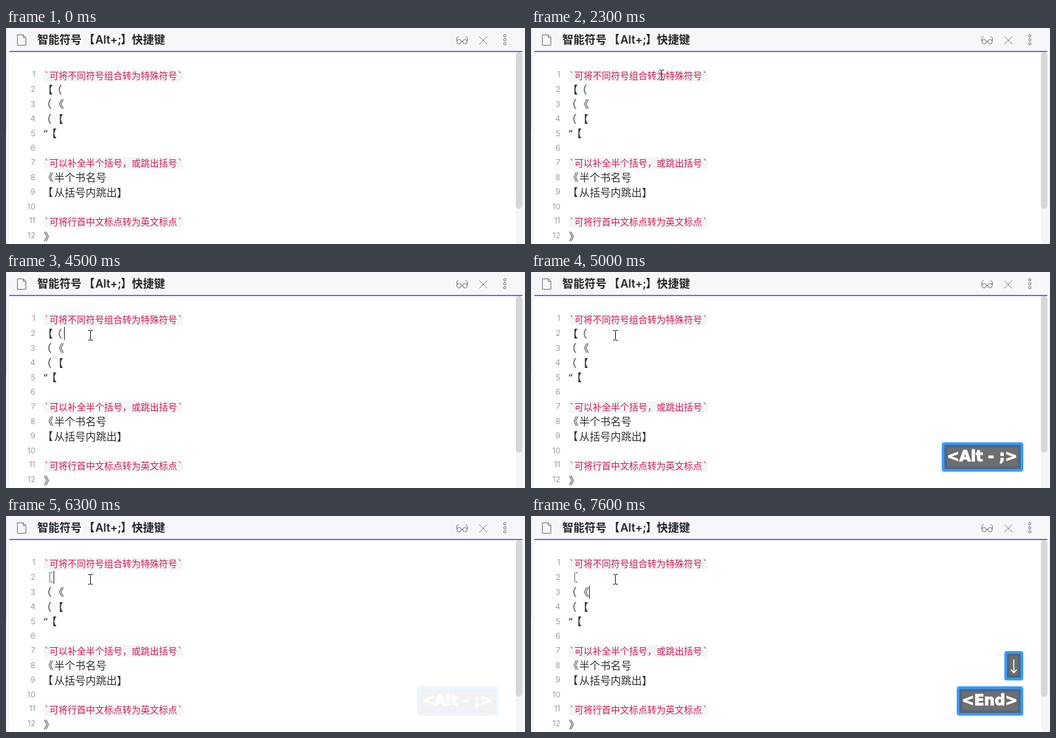
These frames come from a looping animation (796x331 px, 8000 ms). An HTML page with a canvas:

```html
<!DOCTYPE html>
<html lang="zh-CN">
<head>
<meta charset="utf-8">
<title>智能符号</title>
<style>
html, body { margin: 0; width: 100%; height: 100%; overflow: hidden; background: #fff; }
canvas { display: block; width: 796px; height: 331px; }
</style>
</head>
<body>
<canvas id="stage" width="796" height="331"></canvas>
<script>
const ctx = document.getElementById('stage').getContext('2d');
const LOOP = 8000, STEP = 100, ROW = 22.4, BLINK = 530;
const CJK = '"Noto Sans CJK SC", "Noto Sans CJK", sans-serif';
const UI = 'Inter, sans-serif';
const INK = '#2b2e33', GRAY = '#6b6e74';

// Moments of the key presses and the click
const CLICK = 3400, CONVERT = 5070, DOWN = 7200, END = 7600;

// Optical left shift of full-width opening brackets
const SHIFT = { '（': 4, '【': 2, '〖': 2, '《': 1 };

const DOC = `\`可将不同符号组合转为特殊符号\`
【（
（《
（【
“【

\`可以补全半个括号，或跳出括号\`
《半个书名号
【从括号内跳出】

\`可将行首中文标点转为英文标点\`
》`.split('\n');

function rect(x, y, w, h, color, r = 0) {
  ctx.fillStyle = color;
  ctx.beginPath();
  ctx.roundRect(x, y, w, h, r);
  ctx.fill();
}

function stroke(path, color = GRAY, width = 1) {
  ctx.strokeStyle = color;
  ctx.lineWidth = width;
  ctx.stroke(new Path2D(path));
}

function text(str, x, y, font, color, align = 'left') {
  ctx.font = font;
  ctx.fillStyle = color;
  ctx.textAlign = align;
  ctx.fillText(str, x, y);
}

// Full-width characters on an even grid
function cjk(str, x, y, size, color, weight = 400) {
  [...str].forEach((ch, i) => {
    const shift = weight === 400 && SHIFT[ch] || 0;
    const bold = ch === '〖' ? 700 : weight;
    text(ch, x + i * size - shift, y - (shift ? 1 : 0), `${bold} ${size}px ${CJK}`, color);
  });
}

function circle(x, y, r) {
  ctx.beginPath();
  ctx.arc(x, y, r, 0, Math.PI * 2);
  ctx.stroke();
}

function header() {
  rect(0, 0, 796, 331, '#f5f6f8');
  rect(0, 0, 1, 157, '#dcdee3');
  rect(5, 0, 787, 36, '#f7f7fa');
  rect(5, 37, 777, 294, '#fff');
  rect(782, 37, 10, 294, '#f5f5f5');
  rect(782, 37, 10, 240, '#d7d7d7', 5);
  rect(5, 35, 787, 2, '#7b6cd9');

  const ink = '#222529';
  cjk('智能符号', 48, 24, 17, ink, 700);
  cjk('【', 119, 24, 17, ink, 700);
  text('Alt+;', 137, 24, `600 17px ${UI}`, ink);
  cjk('】快捷键', 176, 24, 17, ink, 700);

  stroke('M17.5 10.5h9l4 4v12h-13z M26.5 10.5v4h4');
  stroke('M726 13l12 12m0-12l-12 12', '#7c7f85');
  stroke('M698 20.5h3 M691.5 20v-5l1.5-1.5h1.5 M707.5 20v-5l-1.5-1.5h-1.5');
  for (const side of [-1, 1]) circle(699.5 + side * 4.5, 21, 3.4);
  for (let i = 0; i < 3; i++) circle(765, 12 + i * 6, 1.9);
}

function codeLine(str, y) {
  const mono = '14px "Noto Sans Mono", monospace', red = '#cb2150';
  rect(58, y - 14, 213, 18, '#f4f5f9', 2);
  text('`', 58, y, mono, red);
  cjk(str.slice(1, -1), 66.4, y, 14, red);
  text('`', 262.4, y, mono, red);
}

function editor(t) {
  DOC.forEach((str, i) => {
    const dy = (i - 1) * ROW, y = Math.round(101 + dy);
    const code = str[0] === '`';
    text(i + 1, 45, Math.round(98.3 + dy - (code ? 0.7 : 0)), `12px ${UI}`, '#999ca2', 'right');
    if (code) codeLine(str, y - 1);
    else if (str[0] === '“') {
      text('“', 58, y, '16px "Open Sans", sans-serif', INK);
      cjk(str.slice(1), 64, y, 16, INK);
    } else cjk(i === 1 && t >= CONVERT ? '〖' : str, 58, y, 16, INK);
  });
}

// Every press moves the caret and restarts its blinking
function caret(t) {
  if (t < CLICK) return;
  const since = t >= END ? END : t >= DOWN ? DOWN : t >= CONVERT ? CONVERT : CLICK;
  const x = since === CLICK || since === END ? 89 : 73;
  const on = Math.floor((t + STEP / 2 - since) / BLINK) % 2 === 0;
  if (on) rect(x, since >= DOWN ? 107 : 84, 1, 20, '#222');
}

const progress = (t, from, to) => Math.min(1, Math.max(0, (t - from) / (to - from)));
const smooth = k => k * k * (3 - 2 * k);

function pointer(t) {
  if (t < 400) return;
  // Sweep in on an arc, then three straight glides
  const k = progress(t, 400, 1200);
  const sweep = 1 - (1 - k) ** 1.5;
  const a = smooth(progress(t, 1200, 1600));
  const b = smooth(progress(t, 1900, 2600));
  const c = smooth(progress(t, 2700, 3100));
  const x = Math.round(696 - 559 * sweep - 36 * a + 163 * b - 135 * c);
  const y = Math.round(104 - 28 * sweep - 20 * Math.sin(Math.PI * sweep) - 6 * a + 3 * b + 24 * c);
  rect(x, y - 7, 1, 14, '#111');
  for (const end of [y - 8, y + 7])
    for (const side of [x - 3, x + 1]) rect(side, end, 3, 1, '#111');
}

// Key badge, aligned to the right edge; fades into the white page
function badge(label, width, top, alpha = 1) {
  const x = 755 - width, cx = x + width / 2;
  rect(x, top, width, 45, '#3b99fc', 4);
  rect(x + 4, top + 4, width - 8, 37, '#4c6783');
  rect(x + 8, top + 8, width - 16, 29, '#6e6e6e');
  if (label === '↓') {
    stroke(`M${cx} ${top + 13}v20m-4.5-4.5l4.5 4.5l4.5-4.5`, '#fff', 1.6);
  } else {
    text(label, cx - 0.5, top + 28.5, 'bold 22.6px "DejaVu Sans", sans-serif', '#fff', 'center');
    ctx.strokeStyle = '#fff';
    ctx.lineWidth = 1.1;
    ctx.strokeText(label, cx - 0.5, top + 28.5);
  }
  if (alpha < 1) rect(x, top, width, 45, `rgba(255, 255, 255, ${1 - alpha})`);
}

function badges(t) {
  if (t >= 5000 && t < 6400)
    badge('<Alt - ;>', 125, 261, t < 6100 ? 1 : 0.85 - 0.0038 * (t - 6100));
  if (t >= 7100) badge('↓', 29, t < END ? 261 : 207);
  if (t >= END) badge('<End>', 102, 261);
}

const start = performance.now();
function draw() {
  const now = Math.max(0, performance.now() - start) % LOOP;
  const t = Math.floor(now / STEP) * STEP;
  header();
  editor(t);
  caret(t);
  badges(t);
  pointer(t);
  requestAnimationFrame(draw);
}
draw();
</script>
</body>
</html>
```
